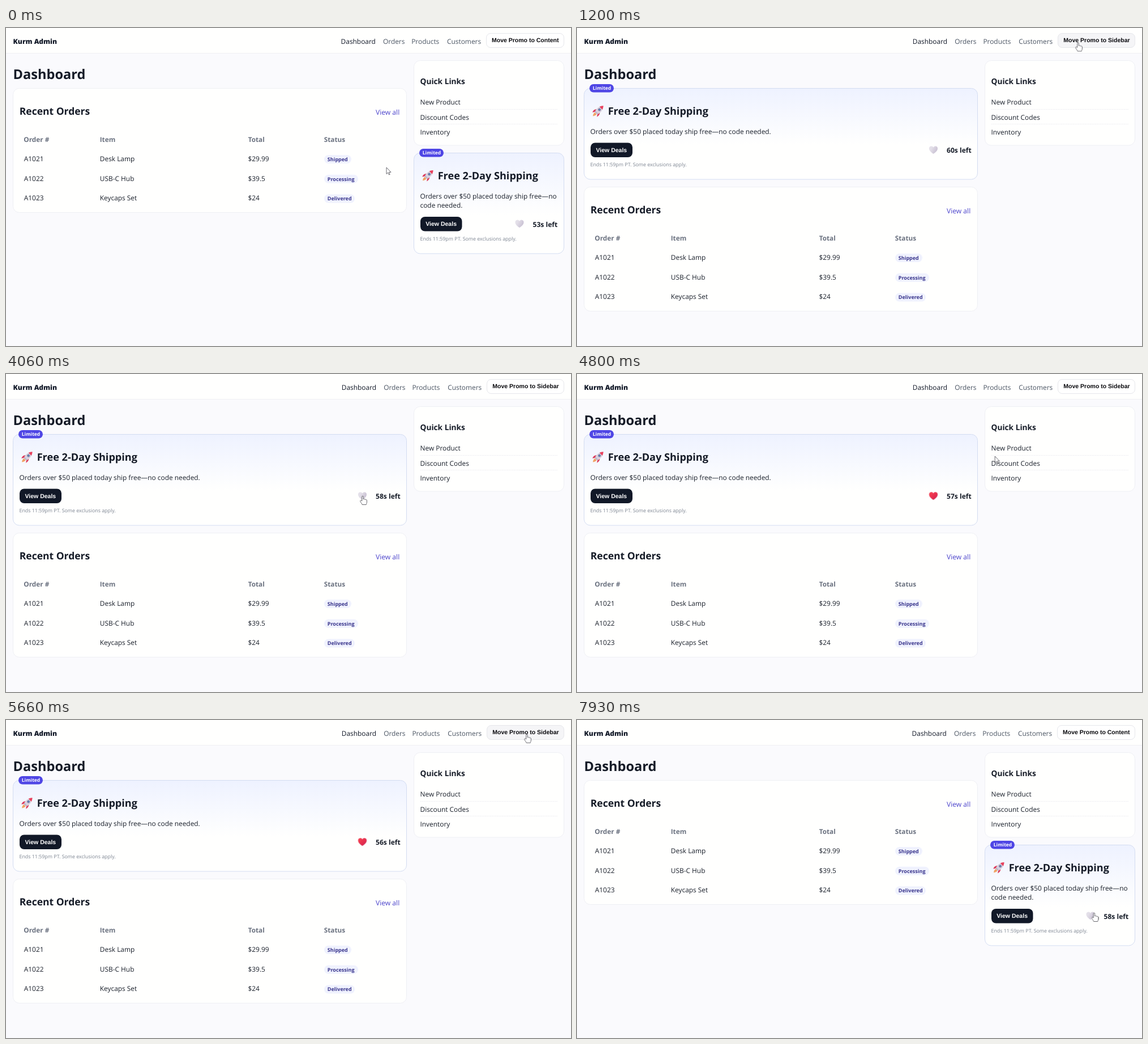
These frames come from a looping animation (998 by 561 pixels, 8 s). An HTML page:

```html
<!DOCTYPE html>
<html lang="en">
<head>
<meta charset="utf-8">
<title>Dashboard</title>
<style>
html, body { margin: 0; width: 100%; height: 100%; overflow: hidden; background: #fafafd; }
svg { display: block; width: 100%; height: 100%; }
text { font: 11.9px "Open Sans", "Noto Sans", sans-serif; fill: #1a202b; text-rendering: geometricPrecision; white-space: pre; }
.h1, .h2, .h3, .th, .tag, .limited, .left { font-weight: 700; fill: #151b27; }
.brand { font-size: 12px; font-weight: 800; fill: #111827; }
.nav text { font-size: 11.9px; font-weight: 500; fill: #4b5563; }
.nav .on { fill: #111827; }
.h1 { font-size: 23.6px; }
.h2 { font-size: 17.5px; }
.h2.offer { font-size: 18.1px; }
.h3 { font-size: 13.7px; }
.th { font-size: 11.8px; fill: #6b7280; }
.tag { font-size: 9px; fill: #39358c; }
.limited { font-size: 8.5px; fill: #fff; }
.left { font-size: 12.1px; }
.link { font-size: 12.1px; font-weight: 500; fill: #4a42cb; }
.fine { font-size: 8.85px; fill: #7d8592; }
.btn { font: 700 10.5px "Liberation Sans", Arial, sans-serif; fill: #0b0b0f; }
.btn.light { fill: #fff; }
.card { fill: #fffffe; stroke: #eeeff4; }
.promo { fill: url(#wash); stroke: #d3dcf1; }
.pill { fill: #f0f2fe; }
.dash { stroke: #eeeef2; stroke-dasharray: 2 1; }
.toggle { fill: #fff; stroke: #e6e7eb; }

/* promo in sidebar / in content */
.side, .main, .orders, .liked, .hand, .arrow, .toggle, #cursor { animation: 8s step-end infinite; }
.side { animation-name: side; }
.main { animation-name: main; }
.orders { animation-name: orders; }
.liked { animation-name: liked; }
.hand { animation-name: hand; }
.arrow { animation-name: arrow; }
.toggle { animation-name: hover; }
#cursor { animation-name: travel; animation-timing-function: ease-in-out; }
@keyframes side { 0%, 73.2%, 100% { visibility: visible } 14.9% { visibility: hidden } }
@keyframes main { 0%, 73.2%, 100% { visibility: hidden } 14.9% { visibility: visible } }
@keyframes orders { 0%, 73.2%, 100% { transform: none } 14.9% { transform: translateY(174px) } }
@keyframes liked { 0%, 73.2%, 100% { opacity: 0 } 51.6% { opacity: 1 } }
@keyframes hover {
  0%, 17%, 74.75%, 100% { fill: #fff }
  12%, 65.5% { fill: #f5f5f7 }
}
@keyframes hand {
  0%, 17%, 55.75%, 74.75% { opacity: 0 }
  12%, 48.75%, 65.5%, 98%, 100% { opacity: 1 }
}
@keyframes arrow {
  0%, 17%, 55.75%, 74.75% { opacity: 1 }
  12%, 48.75%, 65.5%, 98%, 100% { opacity: 0 }
}
@keyframes travel {
  0%, 4.1% { transform: translate(672px, 246px) }
  13.25%, 15.75% { transform: translate(885px, 26.4px) }
  20.75%, 40% { transform: translate(908.5px, 94.5px) }
  50%, 54.1% { transform: translate(630px, 216px) }
  68%, 73.25% { transform: translate(920px, 25.8px) }
  77.5%, 89.1% { transform: translate(920.5px, 70px) }
  99.1%, 100% { transform: translate(913.5px, 341px) }
}
</style>
</head>
<body>
<svg viewBox="0 0 998 561">
  <defs>
    <linearGradient id="wash" x2="0" y2="1">
      <stop stop-color="#eef2ff"/><stop offset=".62" stop-color="#fffffe"/>
    </linearGradient>
    <linearGradient id="pearl" x2="1" y2=".5">
      <stop offset=".3" stop-color="#e4e0e9"/><stop offset="1" stop-color="#c9c1d3"/>
    </linearGradient>
    <linearGradient id="ruby" x2="1" y2="1">
      <stop offset=".2" stop-color="#f43c50"/><stop offset="1" stop-color="#d3204f"/>
    </linearGradient>
    <path id="heart" d="M0 6.7C-4 4-7.5 1-7.5-2.8A4 4 0 0 1 0-4.8 4 4 0 0 1 7.5-2.8C7.5 1 4 4 0 6.7Z"/>
    <g id="rocket">
      <path fill="#f0a264" d="M6 12.5C3.6 13 2.6 15.5 2 19 5 18.4 8 17.5 8.5 15.5Z"/>
      <path fill="#dc3a5c" d="M8.5 6.8C5 6.6 2.6 8.8 1.2 12.2L6 11.5ZM14.2 12.8C14.4 16 12.5 18.6 9.2 20.2L10 15Z"/>
      <path fill="#d8d1df" d="M20.5.8C14 1 8.5 5 5.5 11.5L10 16C16 13 20 8 20.5.8Z"/>
      <path fill="#e8405c" d="M20.5.8C17.5.9 15.6 1.5 13.8 2.4L18.8 7.4C19.9 5.2 20.5 3 20.5.8Z"/>
      <path fill="#b9aec5" d="M5.5 11.5L10 16 11.6 15.1 6.5 9.7Z"/>
      <circle cx="13.6" cy="7.6" r="2" fill="#5a86bd" stroke="#7d7092" stroke-width=".9"/>
    </g>
  </defs>

  <rect width="998" height="561" fill="#fafafd"/>
  <rect width="998" height="44" fill="#fffffe"/>
  <path d="M0 44.5H998" stroke="#efeff3"/>
  <text class="brand" x="12.6" y="27.5">Kurm Admin</text>

  <g class="side">
    <g class="nav">
      <text class="on" x="591.6" y="27.5">Dashboard</text>
      <text x="666" y="27.5">Orders</text>
      <text x="716.2" y="27.5">Products</text>
      <text x="779" y="27.5">Customers</text>
    </g>
    <rect class="toggle" x="848.5" y="9.5" width="137" height="25" rx="7.5"/>
    <text class="btn" x="858" y="25.4">Move Promo to Content</text>
  </g>
  <g class="main">
    <g class="nav">
      <text class="on" x="592.8" y="27.5">Dashboard</text>
      <text x="667.2" y="27.5">Orders</text>
      <text x="717.4" y="27.5">Products</text>
      <text x="780.2" y="27.5">Customers</text>
    </g>
    <rect class="toggle" x="849.5" y="9.5" width="136" height="25" rx="7.5"/>
    <text class="btn" x="859.3" y="25.4">Move Promo to Sidebar</text>
  </g>

  <text class="h1" x="12.6" y="90">Dashboard</text>

  <g class="orders">
    <rect class="card" x="12.5" y="106.5" width="695" height="219" rx="11"/>
    <text class="h2" x="23.8" y="153">Recent Orders</text>
    <text class="link" x="653" y="153">View all</text>
    <text class="th" x="31.3" y="201">Order #</text>
    <text class="th" x="165.7" y="201">Item</text>
    <text class="th" x="427.7" y="201">Total</text>
    <text class="th" x="561.7" y="201">Status</text>

    <text x="31.8" y="234.8">A1021</text>
    <text x="165.8" y="234.8">Desk Lamp</text>
    <text x="427.5" y="234.8">$29.99</text>
    <rect class="pill" x="562" y="224" width="48" height="15" rx="7.5"/>
    <text class="tag" x="567.8" y="234.8">Shipped</text>

    <text x="31.8" y="269.6">A1022</text>
    <text x="165.8" y="269.6">USB-C Hub</text>
    <text x="427.5" y="269.6">$39.5</text>
    <rect class="pill" x="562" y="258.8" width="60" height="15" rx="7.5"/>
    <text class="tag" x="567.8" y="269.6">Processing</text>

    <text x="31.8" y="304.4">A1023</text>
    <text x="165.8" y="304.4">Keycaps Set</text>
    <text x="427.5" y="304.4">$24</text>
    <rect class="pill" x="562" y="293.6" width="54" height="15" rx="7.5"/>
    <text class="tag" x="567.8" y="304.4">Delivered</text>
  </g>

  <rect class="card" x="720.5" y="57.5" width="265" height="149.5" rx="11"/>
  <text class="h3" x="731.5" y="98.5">Quick Links</text>
  <text x="731.5" y="135">New Product</text>
  <path class="dash" d="M732 143.5H974M732 169.5H974"/>
  <text x="731.5" y="161.5">Discount Codes</text>
  <text x="731.5" y="188">Inventory</text>

  <g class="main">
    <rect class="promo" x="12.5" y="106.5" width="695" height="160.5" rx="11"/>
    <rect x="22" y="99" width="43" height="14.5" rx="7.25" fill="#4f46e5"/>
    <text class="limited" x="27.8" y="109.4">Limited</text>
    <use href="#rocket" x="26" y="136.5"/>
    <text class="h2 offer" x="54.7" y="153">Free 2-Day Shipping</text>
    <text x="23.6" y="187">Orders over $50 placed today ship free—no code needed.</text>
    <rect x="24" y="202.5" width="74" height="25.5" rx="8" fill="#111827"/>
    <text class="btn light" x="33.5" y="219">View Deals</text>
    <use href="#heart" x="629.5" y="215.3" fill="url(#pearl)"/>
    <use class="liked" href="#heart" x="629.5" y="215.3" fill="url(#ruby)"/>
    <text class="left" id="contentTimer" x="653" y="220.2"></text>
    <text class="fine" x="23.5" y="244">Ends 11:59pm PT. Some exclusions apply.</text>
  </g>

  <g class="side">
    <rect class="promo" x="720.5" y="220.5" width="265" height="177.5" rx="11"/>
    <rect x="730" y="213" width="43" height="14.5" rx="7.25" fill="#4f46e5"/>
    <text class="limited" x="735.8" y="223.4">Limited</text>
    <use href="#rocket" x="734" y="250.3"/>
    <text class="h2 offer" x="762.7" y="267">Free 2-Day Shipping</text>
    <text x="731.5" y="300.5">Orders over $50 placed today ship free—no</text>
    <text x="731.5" y="317.2">code needed.</text>
    <rect x="732" y="333" width="73.5" height="25.5" rx="8" fill="#111827"/>
    <text class="btn light" x="741.3" y="349.3">View Deals</text>
    <use href="#heart" x="907" y="345.5" fill="url(#pearl)"/>
    <text class="left" id="sidebarTimer" x="930.5" y="350.5"></text>
    <text class="fine" x="731.5" y="374.5">Ends 11:59pm PT. Some exclusions apply.</text>
  </g>

  <g id="cursor" fill="#fff" stroke="#45454c" stroke-width=".8" stroke-linejoin="round">
    <path class="arrow" d="M0 0V11.5L2.7 9 4.5 13 6.2 12.2 4.5 8.4H8Z"/>
    <path class="hand" d="M-1.2 7V.6a1.2 1.2 0 0 1 2.4 0V5c.6-.9 2.2-.7 2.3.3.6-.7 2-.4 2.1.6.7-.5 1.8 0 1.8 1V10c0 2-1 2.800-1.2 4.500H-.8C-1.2 12.600-3.600 10.600-4.300 8.400-4.600 7-2.800 6.200-1.200 8Z"/>
  </g>
</svg>
<script>
const LOOP = 8000, TO_CONTENT = 1200, TO_SIDEBAR = 5860;
const clock = document.getElementById('cursor').getAnimations()[0];
const contentTimer = document.getElementById('contentTimer');
const sidebarTimer = document.getElementById('sidebarTimer');

// Each promo counts down from 60 once it appears.
const countFrom = (start, t) => 60 - Math.max(0, Math.floor((t - start) / 1000));

function sidebarSeconds(t) {
  if (t >= TO_CONTENT) return countFrom(TO_SIDEBAR, t);
  return t < 60 ? 53 : t < 1060 ? 52 : 51;
}

function show(label, seconds) {
  const text = seconds + 's left';
  if (label.textContent !== text) label.textContent = text;
}

function draw() {
  const t = (clock.currentTime || 0) % LOOP;
  show(contentTimer, countFrom(TO_CONTENT, t));
  show(sidebarTimer, sidebarSeconds(t));
  requestAnimationFrame(draw);
}
draw();
</script>
</body>
</html>
```
